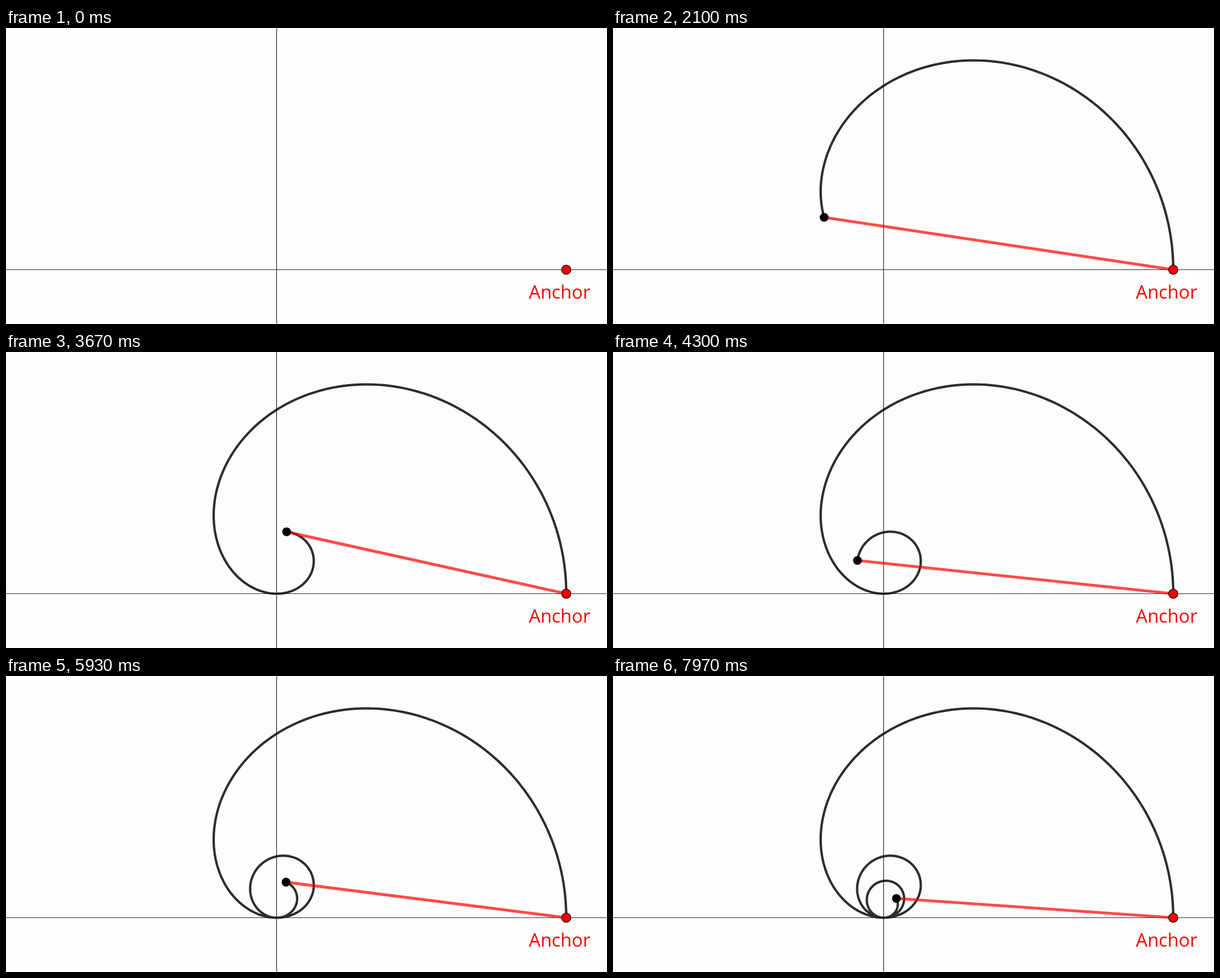
An HTML page with a canvas for the animation above (8000 ms loop, 1065x526 px).

```html
<!DOCTYPE html>
<html lang="en">
<head>
<meta charset="utf-8">
<title>Cochleoid</title>
<style>
  html, body { margin: 0; width: 100%; height: 100%; overflow: hidden; background: #fdfdfc; }
  canvas { display: block; }
</style>
</head>
<body>
<canvas id="stage" width="1065" height="526"></canvas>
<script>
const ctx = document.getElementById('stage').getContext('2d');
const W = 1065, H = 526, LOOP = 8000, FRAME = 1000 / 30;
const ORIGIN = { x: 479.5, y: 429.5 }, SIZE = 513.3;

// [time in ms, angle in radians]
const PACE = [[333, 0], [1133, 1.107], [1533, 1.626], [2767, 3.35],
              [3667, 4.553], [5000, 6.292], [6833, 8.85], [7967, 10.41]];

function angleAt(time) {
  if (time <= PACE[0][0]) return 0;
  const next = Math.max(1, PACE.findIndex(p => p[0] >= time));
  const i = time > PACE[PACE.length - 1][0] ? PACE.length - 1 : next;
  const [t0, a0] = PACE[i - 1], [t1, a1] = PACE[i];
  return a0 + (a1 - a0) * (time - t0) / (t1 - t0);
}

// Cochleoid: r = a * sin(angle) / angle
function pointAt(angle) {
  const r = SIZE * (angle ? Math.sin(angle) / angle : 1);
  return { x: ORIGIN.x + r * Math.cos(angle), y: ORIGIN.y - r * Math.sin(angle) };
}

function stroke(points, color, width) {
  ctx.beginPath();
  points.forEach(p => ctx.lineTo(p.x, p.y));
  ctx.strokeStyle = color;
  ctx.lineWidth = width;
  ctx.stroke();
}

function dot(p, radius, fill) {
  ctx.beginPath();
  ctx.arc(p.x, p.y, radius, 0, 2 * Math.PI);
  ctx.fillStyle = fill;
  ctx.fill();
  ctx.strokeStyle = '#000';
  ctx.lineWidth = 1.2;
  ctx.stroke();
}

function draw(time) {
  const angle = angleAt(time), tip = pointAt(angle), anchor = pointAt(0);

  ctx.fillStyle = '#fdfdfc';
  ctx.fillRect(0, 0, W, H);
  stroke([{ x: 0, y: ORIGIN.y }, { x: W, y: ORIGIN.y }], '#28243c', 1.2);
  stroke([{ x: ORIGIN.x, y: 0 }, { x: ORIGIN.x, y: H }], '#222226', 1.2);

  if (angle > 0) {
    const steps = Math.ceil(angle / 0.02);
    const curve = Array.from({ length: steps + 1 }, (_, i) => pointAt(angle * i / steps));
    ctx.lineJoin = 'round';
    stroke(curve, 'rgba(0, 0, 0, 0.82)', 4.2);
    stroke([tip, anchor], 'rgba(255, 0, 0, 0.7)', 5.2);
    dot(tip, 7.2, '#000');
  }
  dot(anchor, 8.2, '#f00');

  ctx.fillStyle = '#f00a0a';
  ctx.font = '32.5px "Open Sans", "Noto Sans", sans-serif';
  ctx.textAlign = 'center';
  ctx.fillText('Anchor', 981, 480.5);
}

const start = performance.now();
function tick() {
  const time = (performance.now() - start) % LOOP;
  draw(Math.floor((time + 5) / FRAME) % (LOOP / FRAME) * FRAME);
  requestAnimationFrame(tick);
}
tick();
</script>
</body>
</html>
```
